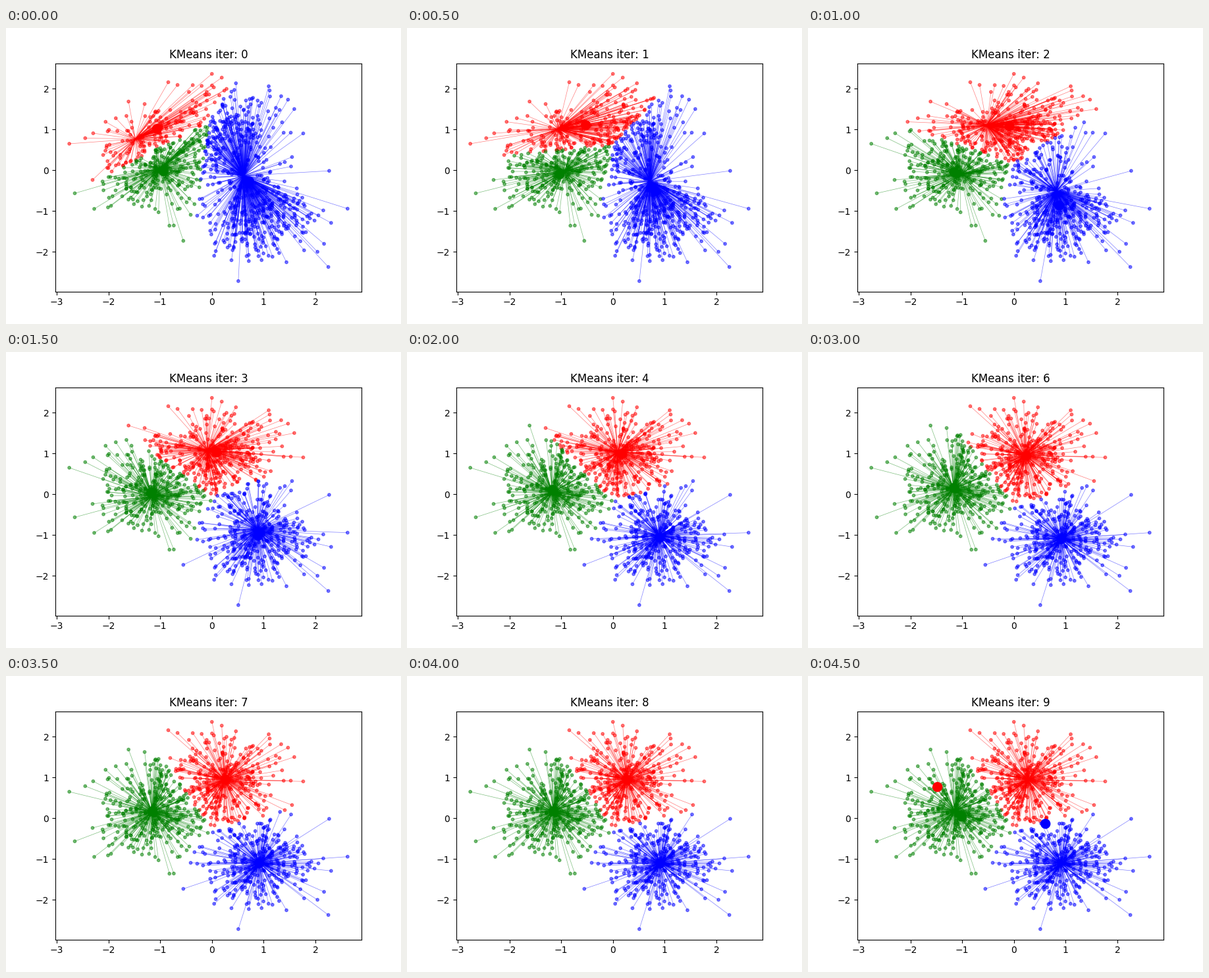
These frames come from a looping animation (600 px wide and 450 px high, 5 s). A matplotlib script:

```python
import matplotlib.pyplot as plt
import numpy as np
from matplotlib.animation import FuncAnimation
from matplotlib.collections import LineCollection

STEPS = 10
COLORS = np.array(["red", "green", "blue"])
START = np.array([[-1.478, 0.765], [-1.006, 0.040], [0.611, -0.137]])


def make_blobs(sizes, seed=0):
    """Standardised, shuffled Gaussian blobs around random centers."""
    rng = np.random.RandomState(seed)
    centers = rng.uniform(-10, 10, size=(len(sizes), 2))
    pts = np.concatenate([rng.normal(c, 1.0, size=(n, 2))
                          for c, n in zip(centers, sizes)])
    order = np.arange(len(pts))
    rng.shuffle(order)
    pts = pts[order]
    return (pts - pts.mean(axis=0)) / pts.std(axis=0)


def assign(pts, centers):
    dist = np.linalg.norm(pts[:, None] - centers[None], axis=2)
    return dist.argmin(axis=1)


def run_kmeans(pts, centers, steps):
    history = []
    for _ in range(steps):
        labels = assign(pts, centers)
        history.append((centers, labels))
        centers = np.array([pts[labels == k].mean(axis=0)
                            for k in range(len(centers))])
    return history


X = make_blobs([334, 333, 333])
history = run_kmeans(X, START, STEPS)

fig, ax = plt.subplots(figsize=(6, 4.5), dpi=100)
dots = ax.scatter(X[:, 0], X[:, 1], s=10, alpha=0.5)
links = LineCollection([], linewidths=0.5, alpha=0.5, zorder=2)
ax.add_collection(links, autolim=False)
heads = ax.scatter(START[:, 0], START[:, 1], s=100, c=COLORS, zorder=3)
title = ax.set_title("KMeans iter: 0")


def update(i):
    centers, labels = history[i]
    order = np.argsort(labels, kind="stable")
    pts, labels = X[order], labels[order]
    colors = COLORS[labels]
    dots.set_offsets(pts)
    dots.set_color(colors)
    links.set_segments(np.stack([pts, centers[labels]], axis=1))
    links.set_color(colors)
    # Big markers show where the centers go next, wrapping to the start
    heads.set_offsets(history[(i + 1) % STEPS][0])
    title.set_text(f"KMeans iter: {i}")
    return dots, links, heads, title


anim = FuncAnimation(fig, update, frames=STEPS, interval=500, repeat=True)
plt.show()
```
